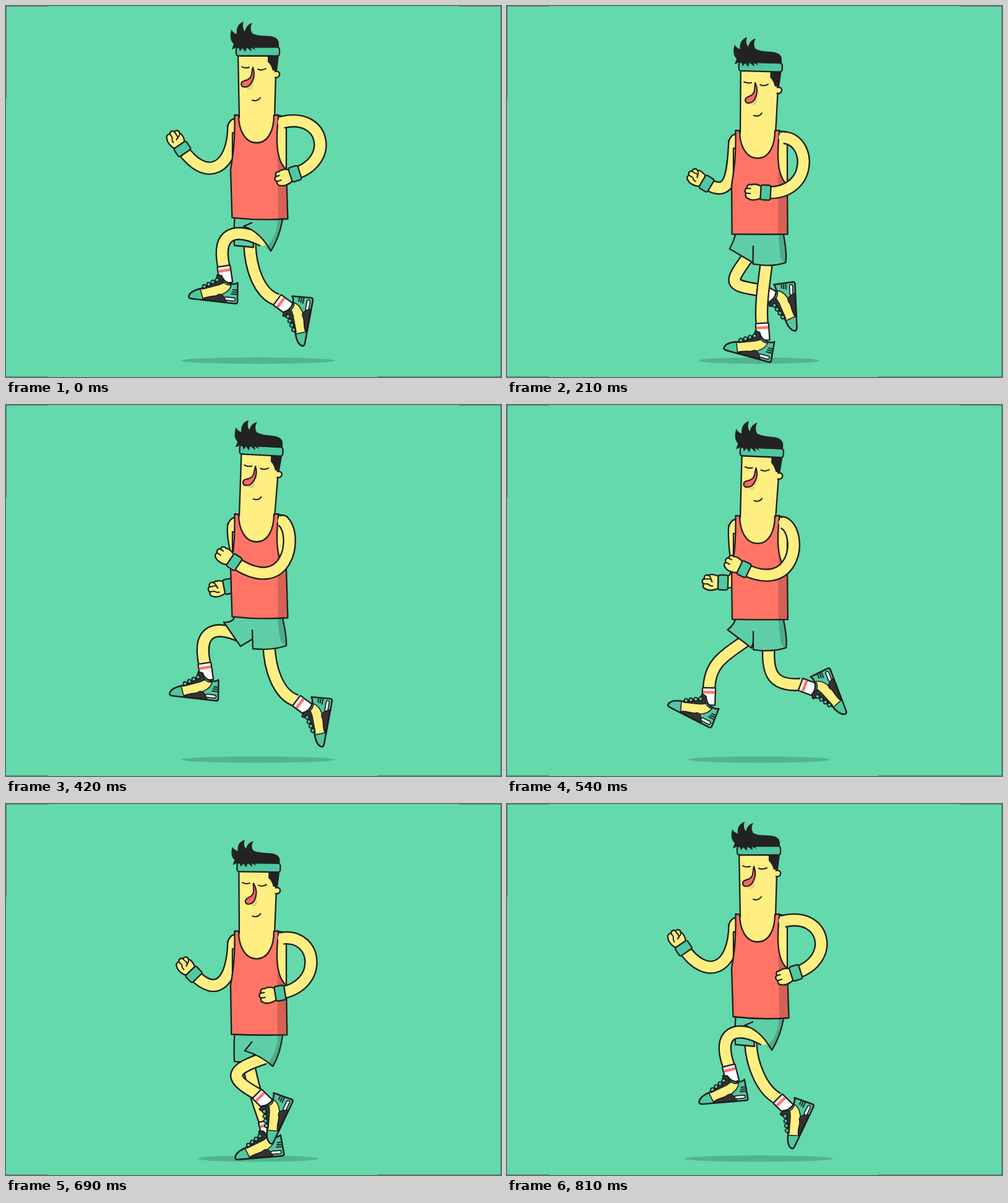
These frames come from a looping animation (800x600 px, 840 ms). An HTML page with a canvas:

```html
<!DOCTYPE html>
<html lang="en">
<head>
<meta charset="utf-8">
<title>Runner</title>
<style>
html, body { margin: 0; height: 100%; overflow: hidden; background: #63d9ac; }
canvas { display: block; }
</style>
</head>
<body>
<canvas id="stage" width="800" height="600"></canvas>
<script>
const ctx = document.getElementById('stage').getContext('2d');
const LOOP = 840, STEP = LOOP / 2, FRAME = 30;
const INK = '#1e1e1e', SKIN = '#ffee82', RED = '#ff7465', BACK = '#63d9ac';
const TEAL = '#4fc8a2', CLOTH = '#5ecea6', SHADE = 'rgba(0,0,0,.17)';
const { sin, cos, atan2, hypot, PI, max, min } = Math;

// Motion rules

const mix = (a, b, k) => a + (b - a) * k;
const radians = degrees => degrees * PI / 180;

// 0 when the near arm is back, 1 when it is in front
function armSwing(time) {
  const u = 1 - Math.abs(time / STEP - 1);
  return u ** 3 * (10 - 15 * u + 6 * u * u);
}

// Smooth bump of height 1 in every step
const pulse = (time, peak, power) => cos(PI * (time - peak) / STEP) ** power;
const bounceAt = time => 30.5 * pulse(time, 251, 4);

// Degrees from straight down, forward is positive
function thighAngle(p) {
  return 39 + 59 * cos(p) - 15 * sin(p) + 18 * cos(2 * p) - 6 * sin(2 * p);
}

// The whole leg follows from its place p in the stride
function legPose(p, bounce) {
  const q = p - 2 * PI * 120 / LOOP;
  const foot = -37.5 + 69 * cos(q) - 4.5 * cos(2 * q);
  const thigh = radians(thighAngle(p));
  const lean = radians(12 - .52 * foot);
  const reach = 43 + 14 * cos(p + PI / 4);
  const hip = [420 - 5 * cos(p), 384 - 5 * cos(p) + bounce];
  const ankle = [
    429 - 72.4 * cos(p) - 23.3 * sin(p) - 8 * cos(2 * p) - 5 * sin(2 * p) + 6.4 * cos(3 * p),
    466.5 + 1.5 * bounce - 18.6 * cos(p) + 25.5 * sin(p) - 5.9 * cos(3 * p) - 5.1 * sin(3 * p)
  ];
  const sock = [ankle[0] - 22 * sin(lean), ankle[1] - 22 * cos(lean)];
  const knee = [hip[0] - reach * sin(thigh), hip[1] + reach * cos(thigh)];
  const shin = [sock[0] - reach * sin(1.35 * lean), sock[1] - reach * cos(1.35 * lean)];
  return { hip, knee, shin, sock, ankle, foot };
}

// Drawing helpers

function paint(path, fill, line) {
  if (fill) { ctx.fillStyle = fill; ctx.fill(path); }
  if (line) { ctx.strokeStyle = INK; ctx.lineWidth = line; ctx.stroke(path); }
}

const shape = (d, fill, line = 2.3) => paint(new Path2D(d), fill, line);

function box(x, y, w, h, r, fill, line = 2.3) {
  const path = new Path2D();
  path.roundRect(x, y, w, h, r);
  paint(path, fill, line);
}

function oval(x, y, rx, ry, fill, line) {
  const path = new Path2D();
  path.ellipse(x, y, rx, ry, 0, 0, 2 * PI);
  paint(path, fill, line);
}

function placed(x, y, angle, draw) {
  ctx.save();
  ctx.translate(x, y);
  ctx.rotate(angle);
  draw();
  ctx.restore();
}

function limb(start, bend1, bend2, end) {
  const path = new Path2D();
  path.moveTo(...start);
  path.bezierCurveTo(...bend1, ...bend2, ...end);
  for (const [width, color, cap] of [[21.5, INK, 'butt'], [16.8, SKIN, 'round']]) {
    ctx.lineCap = cap;
    ctx.lineWidth = width;
    ctx.strokeStyle = color;
    ctx.stroke(path);
  }
  ctx.lineCap = 'butt';
}

// Body parts

function shoe() {
  shape('M-56 33C-55 27-47 22-38 19L-15 6-14-6-7-5C-2 6 12 9 20 3L23 34Q23 37 19 37H-50Q-57 37-56 33Z', TEAL, 2.6);
  shape('M-39 20L-14 7-4 3C0 8 5 9 10 8C9 17 0 24-9 27C-19 30-26 30-33 35Z', SKIN, 1.6);
  shape('M-33 36C-27 30-17 32-10 26C-5 22 1 26 5 36Z', '#333', 1.4);
  shape('M-14-6L-7-5-3 6-10 10-36 20-15 6Z', '#333', 1.4);
  for (let i = 0; i < 4; i++) oval(-33 + 6.5 * i, 15 - 4.3 * i, 3, 3, TEAL, 1.8);
  shape('M13 15H20M12 18.5H20M11 22H21', null, 1.9);
  box(2, 28, 17, 5, 2.5, '#fff', 1.7);
}

function leg(p, bounce) {
  const { hip, knee, shin, sock, ankle, foot } = legPose(p, bounce);
  limb(hip, knee, shin, sock);
  const dx = ankle[0] - sock[0], dy = ankle[1] - sock[1];
  placed(...sock, atan2(dy, dx), () => {
    box(0, -10.5, hypot(dx, dy) + 6, 21, 1, '#fff');
    ctx.fillStyle = RED;
    ctx.fillRect(5, -9.4, 4.5, 18.8);
  });
  placed(...ankle, radians(foot), shoe);
}

function arm(shoulder, bend1, bend2, wrist, palm) {
  limb(shoulder, bend1, bend2, wrist);
  placed(...wrist, atan2(wrist[1] - bend2[1], wrist[0] - bend2[0]), () => {
    shape('M6-9C14-14 24-14 28-11C33-10 33-4 31-3C35-1 34 5 30 5C32 9 28 13 24 11C18 14 10 11 6 9Z', SKIN);
    shape('M31-3H24M30 5H24', null, 2);
    if (palm) shape('M24 11C17 8 22 3 17 0M24-3Q21-7 16-6M24 5Q20 6 18 3', null, 2);
    box(-8, -12, 16, 24, 3, TEAL);
  });
}

function farArm(swing) {
  const bend1 = [mix(368, 362, swing), mix(266, 235, swing)];
  const bend2 = [mix(322, 400, swing), 285];
  arm([368, 192], bend1, bend2, [mix(285, 360, swing), mix(231, 293, swing)], true);
  shape('M372 182Q362 181 358 195', null);
  shape('M366 205V258H380V205Z', SKIN);
}

function nearArm(swing) {
  const bend1 = [mix(515, 473, swing), mix(172, 212, swing)];
  const bend2 = [mix(532, 455, swing), mix(250, 312, swing)];
  const dip = 14 * sin(PI * swing);
  arm([447.5, 187.5], bend1, bend2, [mix(467, 369, swing), mix(271, 254, swing) + dip], false);
  shape(`M440 177.5Q${446 + 4 * swing} 177 ${447 + 8.5 * swing} ${177.7 + 3.5 * swing}`, null);
}

function head(tilt, hair, nose) {
  placed(405, 180, radians(tilt), () => {
    ctx.translate(-405, -180);
    shape('M375 74L377 181V222H434V181L437 74Z', SKIN, 0);
    shape('M375 74L377 181M434 181L437 74');
    shape('M434 106C445 102 445 118 434 115', SKIN);
    shape('M423 80H441L438 105 431 104Q428 94 423 90Z', '#222', 0);
    box(372, 66, 70, 14.5, 4, TEAL);
    ctx.save();
    ctx.translate(0, 66);
    ctx.scale(1, hair);
    shape('M372 1L365 4 368-5Q360-12 364-28Q368-22 373-21Q371-36 384-41Q381-32 386-25Q388-36 398-39Q393-30 398-22Q406-18 420-18Q441-18 441-5V1H401L403 5 396 1 397 7 389 1 387 8 382 2 378 7 376 1Z', '#222', 0);
    ctx.restore();
    ctx.lineCap = 'round';
    shape('M381 98Q386 101 393 99M407 102Q413 105 420 101M398 152Q406 155 411 148', null, 2);
    placed(398, 99, radians(nose), () => {
      shape('M-11 33Q-5 39 0 34L2 17Z', 'rgba(0,0,0,.1)', 0);
      shape('M1 0C-2 8 1 16-8 20C-15 22-19 23-18 28C-17 33-8 33-3 27C3 19 4 9 1 0Z', '#f9666a', 2);
    });
  });
}

function shirt(flare) {
  const left = 363.5 + flare, right = 453.5 + flare;
  const hem = `${right} 344Q410 ${344 + 1.6 * flare} ${left} ${344 - flare}`;
  shape(`M369.5 176L376 176.5C376 200 386 221 405 221C424 221 433 200 433 176.5L440.5 176C436 215 436 250 453 264L${hem}L363 264C368 235 370 215 369.5 176Z`, RED);
  shape(`M438.5 240Q442 256 452 265L${right - 1} 343 ${438 + flare} 344Z`, SHADE, 0);
}

// A raised thigh pulls up its leg of the shorts
function lifted(p) {
  const lift = max(0, min(1, thighAngle(p) / 112));
  return [lift, lift * (2 - lift)];
}

function farShorts(p) {
  const [lift, ease] = lifted(p);
  shape(`M370 340Q368 352 ${369 - 17 * ease} ${387 - 36 * ease}L${400 - 21 * lift * lift} 390L399 378 436 340Z`, CLOTH);
}

function nearShorts(p) {
  const [lift, ease] = lifted(p);
  const tipX = 453 - 25 * ease, tipY = 389 + 7 * ease;
  const innerX = 399 - 15 * ease, innerY = 394 - 38 * lift;
  const notch = 363 - 13 * lift;
  const side = `Q${(447 + tipX) / 2 + 4} 375 ${tipX} ${tipY}`;
  const hem = `Q${(innerX + tipX) / 2 + 4} ${min(innerY, tipY) + 8} ${innerX} ${innerY}L398 ${notch}`;
  shape(`M398 340H447V345${side}${hem}Z`, CLOTH, 0);
  shape(`M439 342H447${side}L${tipX - 8} ${tipY - 5}Q440 370 439 342Z`, SHADE, 0);
  shape(`M447 342V345${side}${hem}`);
}

function backdrop(radius) {
  ctx.fillStyle = BACK;
  ctx.fillRect(0, 0, 800, 600);
  shape('M0 .5H68M732 .5H800M.5 0V150M799.5 0V600M0 599.5H68M600 599.5H800', null, .45);
  oval(407, 573.5, radius, 5.2, SHADE);
}

function draw(time) {
  const near = 2 * PI * time / LOOP, far = near + PI;
  const bounce = bounceAt(time), swing = armSwing(time);
  const onBody = part => placed(0, bounce, 0, part);

  ctx.lineJoin = 'round';
  backdrop(126 - 29.5 * pulse(time, 240, 2));
  onBody(() => farArm(swing));
  placed(-31, -3, 0, () => leg(far, bounce));
  onBody(() => farShorts(far));
  leg(near, bounce);
  onBody(() => {
    nearShorts(near);
    shape('M436 177.5Q452 177 453 196V266H436Z', SKIN);
    head(3 * swing, 1.03 - .15 * pulse(time, 310, 4), -13 * pulse(time, 275, 4));
    shirt(1 + cos(2 * PI * (time + 30) / STEP));
    nearArm(swing);
  });
}

function tick() {
  draw(Math.floor(performance.now() / FRAME) * FRAME % LOOP);
  requestAnimationFrame(tick);
}
tick();
</script>
</body>
</html>
```
